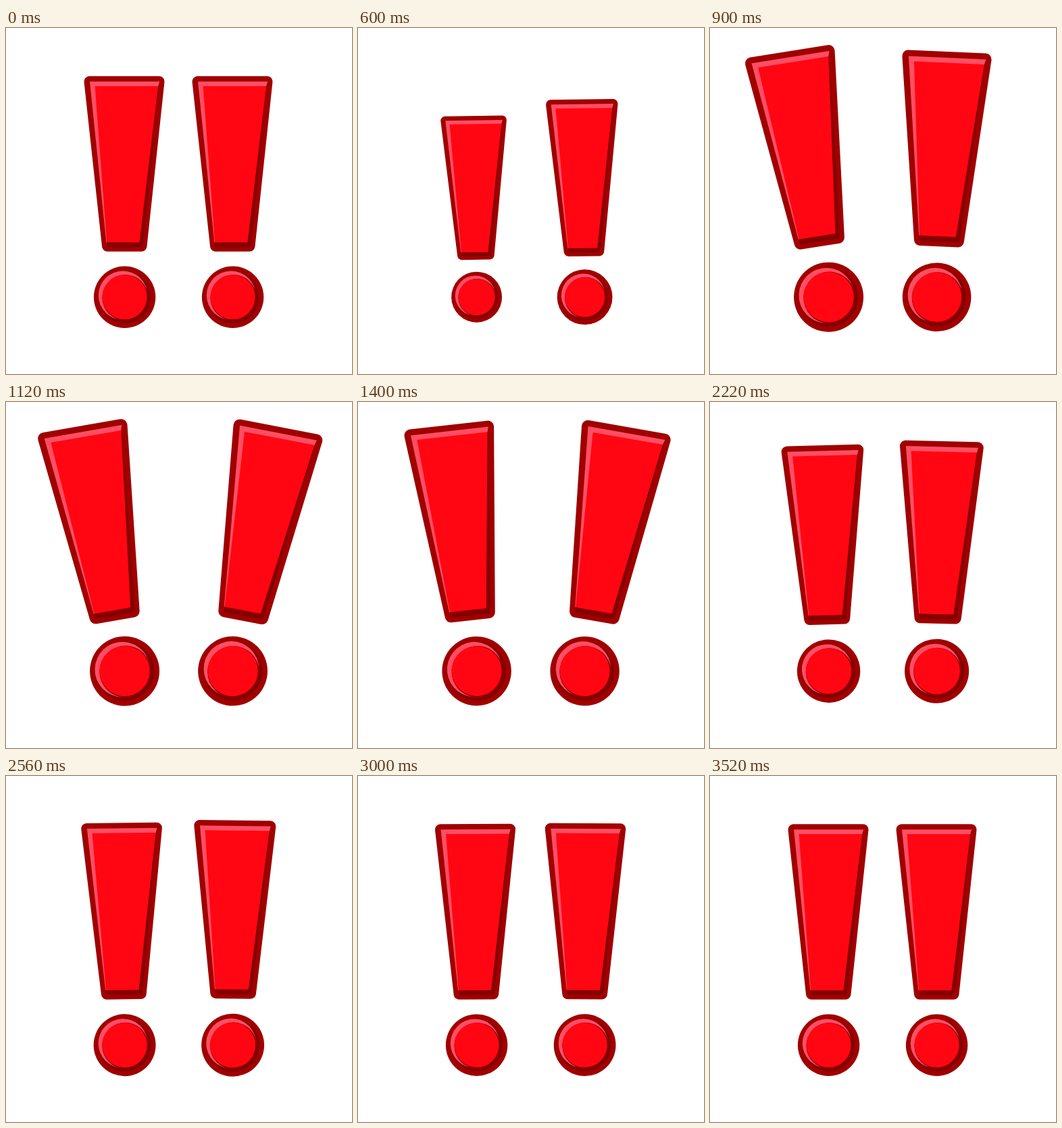
Animation, 512 px wide and 512 px high, one loop 3600 ms. Source, as an HTML page with a canvas:

```html
<!DOCTYPE html>
<html lang="en">
<head>
<meta charset="utf-8">
<title>Double exclamation</title>
<style>
  html, body { margin: 0; width: 100%; height: 100%; overflow: hidden; background: #fff; }
  canvas { display: block; width: 100vw; height: 100vh; }
</style>
</head>
<body>
<canvas id="stage" width="512" height="512"></canvas>
<script>
const ctx = document.getElementById('stage').getContext('2d');
const LOOP = 3600, STEP = 20, BEGIN = 380, TURN = 600, END = 3520;
const RIM = '#a00000', SHADE = '#840000', GLOW = '#ff4e63', FACE = '#ff0612';

const part = (t, from, to) => Math.min(1, Math.max(0, (t - from) / (to - from)));
const easeInOut = u => (1 - Math.cos(Math.PI * u)) / 2;
const easeOut = u => 1 - (1 - u) ** 3;
// Rises from 0 towards 1, slowly at both ends.
const grow = (t, from, span, power) =>
  1 - Math.exp(-((Math.max(0, t - from) / span) ** power));

// Shrink, pop past full size, then settle.
function size(t, { dip, peak, popEnd, settle }) {
  return 1 - dip * easeInOut(part(t, BEGIN, TURN))
    + (dip + peak) * easeOut(part(t, TURN, popEnd))
    - peak * grow(t, 1250, settle, 1.9);
}

// Degrees by which the marks lean apart.
function spread(t) {
  return 8.43 * Math.exp((1400 - t) / 463) * grow(t, 540, 560, 3);
}

// Degrees by which both marks rock together.
function wobble(t) {
  const reach = 4.1 * easeInOut(part(t, 440, TURN)) * Math.exp(-(((t - 700) / 773) ** 2));
  return -reach * Math.cos(2 * Math.PI * (t - 870) / 345);
}

const marks = [
  { x: 175.6, side: -1, dip: 0.18, peak: 0.127, popEnd: 850, settle: 720 },
  { x: 335.6, side: 1, dip: 0.105, peak: 0.125, popEnd: 1090, settle: 910 }
];

function poly(color, points, line) {
  ctx.beginPath();
  points.forEach(([x, y]) => ctx.lineTo(x, y));
  ctx.closePath();
  ctx.fillStyle = color;
  ctx.fill();
  if (line) {
    ctx.strokeStyle = color;
    ctx.lineWidth = line;
    ctx.stroke();
  }
}

function disc(color, x, y, r) {
  ctx.beginPath();
  ctx.arc(x, y, r, 0, 2 * Math.PI);
  ctx.fillStyle = color;
  ctx.fill();
}

// One mark, drawn around the centre of its dot.
function drawMark(x, scale, degrees) {
  ctx.save();
  ctx.translate(x, 398.2);
  ctx.rotate(degrees * Math.PI / 180);
  ctx.scale(scale, scale);

  poly(RIM, [[-52.1, -319], [50.9, -319], [24.9, -75.5], [-25.6, -75.5]], 16);
  poly(SHADE, [[-46, -316], [51.5, -319], [26.5, -74], [-26, -74]]);
  poly(GLOW, [[-51.6, -319], [51.6, -319], [49.6, -312.2], [-26.5, -81], [-27.2, -81]]);
  poly(FACE, [[-44, -312.2], [49.6, -312.2], [21.8, -81], [-26.5, -81]]);

  disc(RIM, 0, 0, 45.7);
  disc(SHADE, 0, 0, 38.8);
  disc(GLOW, -2.5, -2.5, 36.3);
  disc(SHADE, 0.8, 0.8, 34);
  disc(FACE, 0, 0, 33);
  ctx.restore();
}

function draw(t) {
  const moving = t >= BEGIN && t < END;
  ctx.fillStyle = '#fff';
  ctx.fillRect(0, 0, 512, 512);
  ctx.lineJoin = 'round';
  for (const m of marks) {
    if (moving) drawMark(m.x, size(t, m), wobble(t) + m.side * spread(t));
    else drawMark(m.x, 1, 0);
  }
}

const start = performance.now();
function tick() {
  const t = (performance.now() - start) % LOOP;
  draw(Math.floor(t / STEP) * STEP);
  requestAnimationFrame(tick);
}
tick();
</script>
</body>
</html>
```
